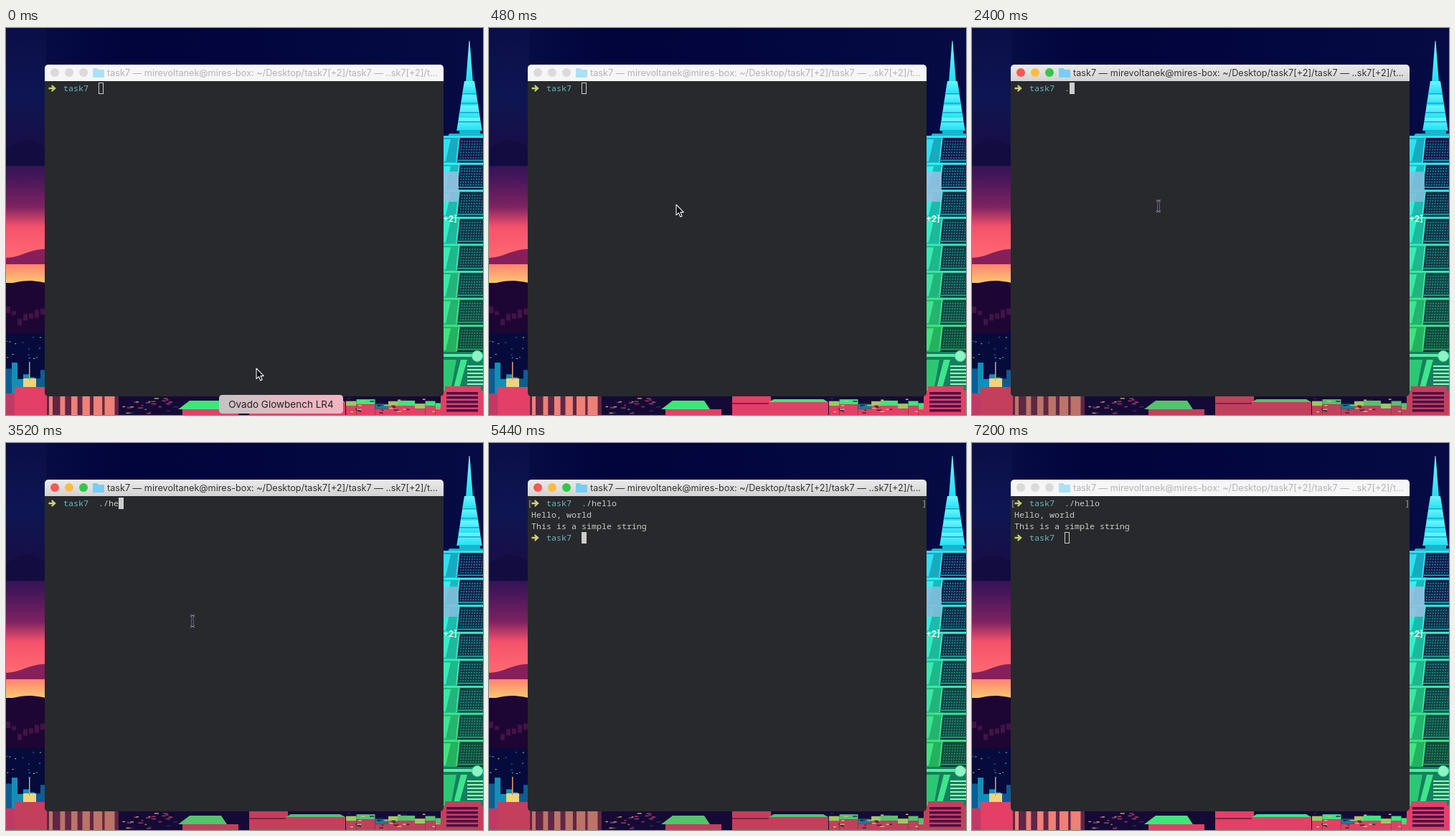
These frames come from a looping animation (665x539 px, 7.36 s). An HTML page:

```html
<!DOCTYPE html>
<html lang="en">
<head>
<meta charset="utf-8">
<title>Terminal session</title>
<style>
  html, body { margin: 0; width: 100%; height: 100%; overflow: hidden; background: #02043c; }
  svg { display: block; width: 665px; height: 539px; --pink: #c43f5c; --rose: #bb7468; --green: #55c26c; --sky: #86bcdc; }
  svg.idle { --pink: #e43f66; --rose: #ee8078; --green: #3ee67a; --sky: #9bbfe2; }
  .ui { font-family: Inter, "Open Sans", sans-serif; }
  .term { font: 11.67px "Noto Sans Mono", "DejaVu Sans Mono", monospace; white-space: pre; fill: #cbcbc6; }
  .dir { fill: #69b9c2; }
  .arrow { fill: #d3d27c; }
  .idle .arrow { fill: #c2d46c; }
  .title { font-size: 12.65px; fill: #333; }
  .idle .title { fill: #b3b3b3; }
  .bar { fill: url(#bar); }
  .idle .bar { fill: #f6f6f6; }
  .idle .light { fill: #dadada; }
  .folder { fill: #78cdf2; }
  .idle .folder { fill: #a9e1f5; }
  .block { fill: #cdcdcb; }
  .idle .block { fill: none; stroke: #cdcdcb; }
</style>
</head>
<body>
<svg id="stage" viewBox="0 0 665 539">
  <defs>
    <linearGradient id="bar" x2="0" y2="1"><stop stop-color="#ebebeb"/><stop offset="1" stop-color="#d2d2d2"/></linearGradient>
    <linearGradient id="tip"><stop stop-color="#c6c2c4"/><stop offset=".45" stop-color="#dfbcc2"/><stop offset="1" stop-color="#f3b3bf"/></linearGradient>
    <linearGradient id="night">
      <stop stop-color="#0a1048"/><stop offset=".25" stop-color="#02043c"/>
      <stop offset=".5" stop-color="#03063e"/><stop offset="1" stop-color="#060b45"/>
    </linearGradient>
    <linearGradient id="dusk" x2="0" y2="1">
      <stop stop-color="#0b0e48"/><stop offset=".28" stop-color="#0e1652"/>
      <stop offset=".45" stop-color="#170f48"/><stop offset=".58" stop-color="#43165a"/>
      <stop offset=".7" stop-color="#7c2262"/><stop offset=".78" stop-color="#f4526c"/>
      <stop offset=".9" stop-color="#ff6a70"/><stop offset="1" stop-color="#fbc872"/>
    </linearGradient>
    <linearGradient id="spire" x2="0" y2="1"><stop stop-color="#6ff4ff"/><stop offset="1" stop-color="#1fe0f2"/></linearGradient>
    <path id="ibeam" d="M257 240.5q3 0 3 2.5V253q0 2.5-3 2.5M263 240.5q-3 0-3 2.5V253q0 2.5 3 2.5M258 249h4"/>
  </defs>
  <g id="scene"></g>

  <rect x="600" y="200" width="31" height="42" rx="2" fill="var(--sky)" opacity=".85"/>
  <text class="ui" x="609" y="270" font-size="12" font-weight="600" fill="#fff">+2]</text>

  <rect x="54" y="51" width="556" height="462" rx="5" fill="#28292d"/>
  <path class="bar" d="M54 74V56a5 5 0 0 1 5-5H605a5 5 0 0 1 5 5V74Z"/>
  <circle class="light" cx="68" cy="62" r="6" fill="#fc5753"/>
  <circle class="light" cx="88" cy="62" r="6" fill="#fdbc40"/>
  <circle class="light" cx="108" cy="62" r="6" fill="#33c748"/>
  <path class="folder" d="M121 57q0-1 1-1h5l2 2h7q1 0 1 1v9q0 1-1 1h-14q-1 0-1-1Z"/>
  <text class="ui title" x="141" y="67">task7 — mirevoltanek@mires-box: ~/Desktop/task7[+2]/task7 — ..sk7[+2]/t...</text>

  <g class="term">
    <g id="marks" fill="#a2a2a2"><text x="53.5" y="88">[</text><text x="603.5" y="88">]</text></g>
    <g id="prompt">
      <path class="arrow" d="M59.5 82.7h5.2l-1.7-2.4 1.4-1 5.4 4.7-5.4 4.7-1.4-1 1.7-2.4h-5.2Z"/>
      <text class="dir" x="80" y="88">task7</text>
    </g>
    <use id="again" href="#prompt" y="48"/>
    <text id="typed" x="129" y="88"></text>
    <g id="output">
      <text x="59" y="104">Hello, world</text>
      <text x="59" y="120">This is a simple string</text>
    </g>
    <rect id="caret" class="block"/>
  </g>

  <g id="dock">
    <rect x="297" y="511" width="173" height="26" rx="4.5" fill="url(#tip)"/>
    <text class="ui" x="383.5" y="529" font-size="13.5" text-anchor="middle" fill="#262226">Ovado Glowbench LR4</text>
  </g>
  <path id="mouse" d="M0 0V14.6L3.4 11.5 5.8 17 8.2 16 5.9 10.6H10.4Z" fill="#12121c" stroke="#f2f2f4" stroke-width="1.1" stroke-linejoin="round"/>
  <g id="beam" fill="none">
    <use href="#ibeam" stroke="#b4adc6" stroke-width="2.6"/>
    <use href="#ibeam" stroke="#111116"/>
  </g>
</svg>
<script>
const $ = id => document.getElementById(id);
const LOOP = 7360, STEP = 160;

let seed = 11;
const rand = (a = 0, b = 1) => a + (b - a) * (seed = seed * 16807 % 2147483647) / 2147483647;
const pick = list => list[Math.floor(rand(0, list.length))];
const rect = (x, y, w, h, fill) => `<rect x="${x}" y="${y}" width="${w}" height="${h}" fill="${fill}"/>`;
const quad = (x1, x2, y, x3, x4, y2, fill) =>
  `<path d="M${x1} ${y}H${x2}L${x4} ${y2}H${x3}Z" fill="${fill}"/>`;
const repeat = (n, make) => Array.from({ length: n }, (_, i) => make(i)).join('');
const PINK = 'var(--pink)', ROSE = 'var(--rose)', GREEN = 'var(--green)';

// Wavy band across the left edge
function ridge(y, amp, phase, depth, fill) {
  const edge = x => y + amp * Math.sin(x / 17 + phase);
  let d = `M0 ${y + depth}`;
  for (let x = 0; x <= 56; x += 4) d += `L${x} ${edge(x)}`;
  return `<path d="${d}V${y + depth}Z" fill="${fill}"/>`;
}

function dusk() {
  return rect(0, 0, 665, 539, 'url(#night)')
    + rect(0, 52, 56, 310, '#0b0e48') + rect(0, 0, 56, 355, 'url(#dusk)')
    + ridge(166, 10, 3, 26, '#130c40')
    + ridge(314, 6, 1.6, 15, '#87205a')
    + ridge(356, 4, 2.8, 100, '#1d0634')
    + rect(0, 425, 56, 114, '#060b3c')
    + repeat(7, i => rect(i * 8, rand(388, 408), 6, rand(5, 14), '#431347'))
    + repeat(14, () => rect(rand(0, 52), rand(430, 460), 2, 1, pick(['#25c6d8', '#128fb8', '#f0c060'])))
    + repeat(7, i => rect(i * 8, rand(466, 490), 8, 50, pick(['#22dbe4', '#128fb8', '#0d5d92'])))
    + rect(24, 488, 18, 12, '#f3d37a') + rect(32, 465, 1.5, 26, '#e8a070')
    + rect(0, 509, 14, 30, '#c13a66') + rect(12, 500, 45, 39, PINK);
}

function storey(i) {
  const y = 150 + i * 37.6, k = i / 7;
  const tone = (h, s, l) => `hsl(${h - 42 * k} ${s}% ${l}%)`;
  const lit = tone(186, 90 - 15 * k, 57), mid = tone(187, 78 - 12 * k, 42), deep = tone(228 - 16 * k, 66, 17);
  return quad(600, 632, y, 600, 628, y + 38, mid)
    + quad(610, 620, y + 5, 610, 613, y + 36, lit)
    + quad(631, 665, y, 628, 665, y + 37, deep)
    + repeat(7, r => `<path d="M${635 - r * .4} ${y + 8 + r * 3.8}H664" stroke="${lit}" stroke-width="1.6" stroke-dasharray="1.8 1.8" opacity=".55"/>`)
    + `<path d="M632 ${y}L628 ${y + 37}" stroke="${lit}" stroke-width="2"/>`
    + rect(610, y, 55, 3, lit) + rect(628, y + 33.5, 37, 1.5, mid);
}

function tower() {
  const tier = i => quad(639 - i * 2.6, 653 + i * 2.6, 74 + i * 17, 636 - i * 2.6, 656 + i * 2.6, 92 + i * 17, 'url(#spire)');
  return quad(645.5, 646.5, 18, 641, 651, 76, 'url(#spire)')
    + repeat(4, tier)
    + rect(632, 142, 29, 8, '#16b6cf')
    + repeat(4, i => rect(636 - i * 2, 91 + i * 13, 20 + i * 4, 1.5, '#12a8c8'))
    + quad(618, 665, 147, 606, 665, 170, '#1cb5c6')
    + repeat(8, storey)
    + rect(610, 451, 55, 54, '#15805e')
    + quad(610, 628, 462, 610, 620, 505, '#2bc873')
    + quad(634, 643, 462, 623, 631, 505, '#3fe48b')
    + rect(610, 454, 55, 4, '#57eda0')
    + repeat(6, i => rect(643, 470 + i * 5, 22, 2, '#9df6bd'))
    + '<circle cx="657" cy="457" r="7.5" fill="#8ff3c4" stroke="#3fd89b"/>';
}

function blocks(x, end, colors) {
  let s = '';
  while (x < end) {
    const w = rand(12, 26), y = rand(514, 524);
    s += rect(x, y, w, 7, pick(colors)) + rect(x, y + 7, w, 32, PINK);
    x += w;
  }
  return s;
}

function city() {
  const dashes = (n, x, end, colors) =>
    repeat(n, () => rect(rand(x, end), rand(515, 536), rand(2, 7), 1.5, pick(colors)));
  return rect(57, 510, 608, 29, '#150a35')
    + rect(57, 510, 100, 29, '#5f2645')
    + repeat(6, i => rect(60 + i * 15.5, 510, 5 + i * 1.8, 29, ROSE))
    + dashes(30, 160, 236, ['#2b2a6a', '#a03a62', '#c4985c'])
    + quad(256, 300, 519, 240, 308, 531, GREEN) + rect(246, 531, 78, 8, PINK)
    + rect(339, 513, 54, 26, PINK) + rect(339, 522, 54, 2, '#79264f')
    + quad(397, 466, 517, 390, 473, 521, GREEN) + rect(390, 521, 83, 18, PINK)
    + blocks(474, 600, [GREEN, GREEN, '#9ec860', '#1c7d90'])
    + dashes(30, 475, 600, ['#18304f', '#4c1840', '#d8b868'])
    + rect(612, 499, 50, 10, PINK) + rect(606, 505, 59, 34, PINK)
    + repeat(5, i => rect(614, 507 + i * 6, 44, 3.5, '#4a1044'));
}

$('scene').innerHTML = dusk() + tower() + city();

const command = './hello';
const keys = [[2400, 1], [2560, 2], [3200, 3], [3520, 4], [3680, command.length]];
const typedAt = t => command.slice(0, keys.reduce((n, [start, count]) => t >= start ? count : n, 0));
const ease = k => k * k * (3 - 2 * k);
const show = (id, on) => $(id).style.display = on ? '' : 'none';

function draw(t) {
  const idle = t < 640 || t >= 7200;
  const ran = t >= 4480, ready = t >= 4640;
  const text = typedAt(t);
  const k = ease(Math.min(1, Math.floor(t / STEP) / 3));

  $('stage').classList.toggle('idle', idle);
  $('typed').textContent = text;
  show('marks', ran);
  show('output', ran);
  show('again', ready);
  show('mouse', t < 640);
  show('beam', t >= 640 && t < 5440);
  $('dock').setAttribute('opacity', Math.max(0, 1 - 2 * k));
  $('mouse').setAttribute('transform', `translate(${349 - 88 * k} ${474 - 228 * k})`);

  const inset = idle ? .5 : 0;
  const x = ready ? 129 : ran ? 59 : 129 + text.length * 7;
  const box = { x: x + inset, y: (ran ? 124 : 76) + inset, width: 7 - 2 * inset, height: 16 - 2 * inset };
  for (const name in box) $('caret').setAttribute(name, box[name]);
}

const begin = performance.now();
function tick() {
  draw((performance.now() - begin) % LOOP);
  requestAnimationFrame(tick);
}
tick();
</script>
</body>
</html>
```
